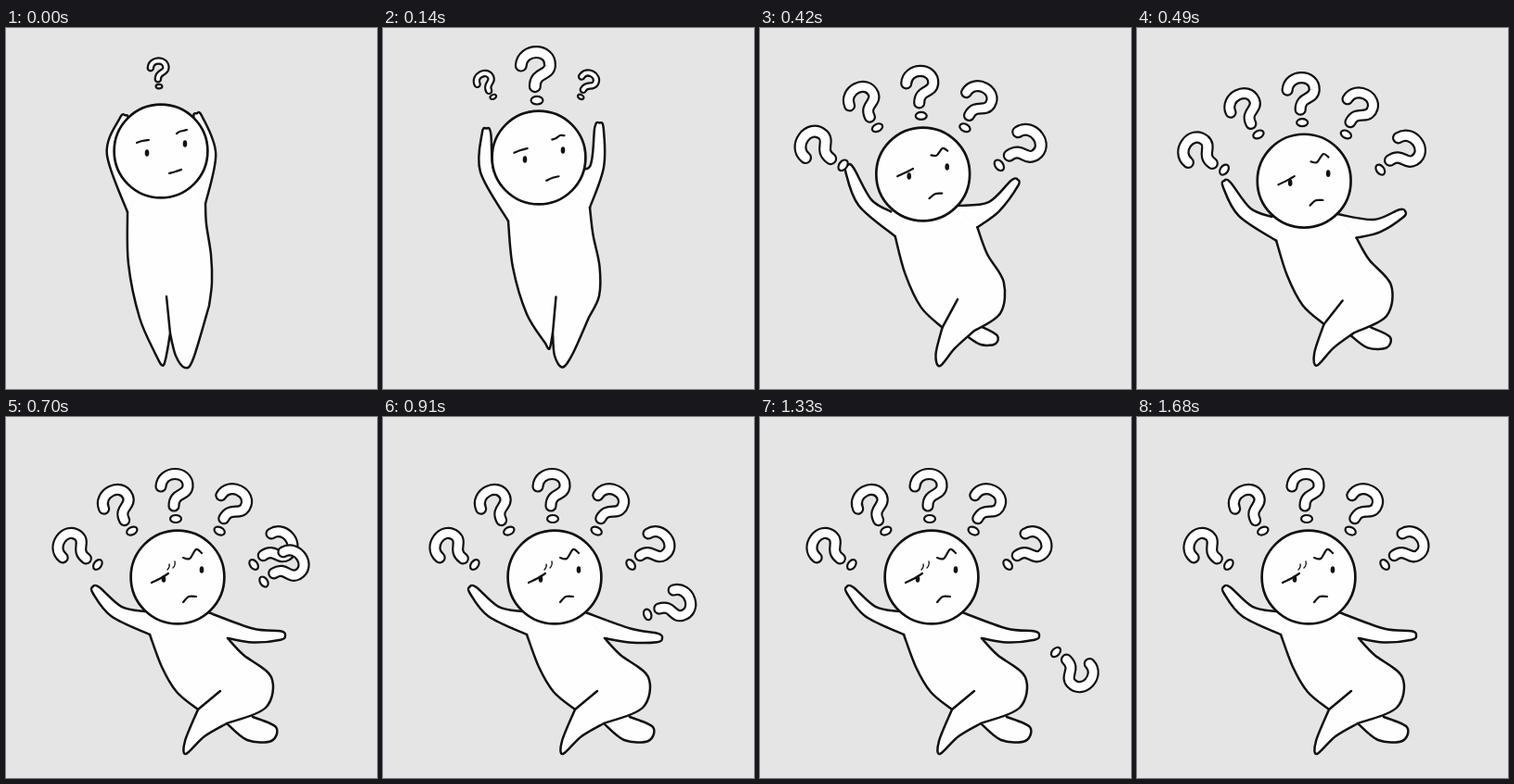
Write an HTML page with a canvas that moves like this. It is 400 px wide and 390 px high and loops after 1.75 s.

```html
<!DOCTYPE html>
<html lang="en">
<head>
<meta charset="utf-8">
<title>Confused</title>
<style>
html, body { margin: 0; width: 100%; height: 100%; overflow: hidden; background: #e5e5e5; }
canvas { display: block; }
</style>
</head>
<body>
<canvas id="stage" width="400" height="390"></canvas>
<script>
const ctx = document.getElementById('stage').getContext('2d');
const STEP = 70, STEPS = 25, SETTLED = 8;
const PAPER = '#e5e5e5', WHITE = '#fefefe', INK = '#111';

const points = text => text.split(' ').map(p => p.split(',').map(Number));
const parse = parts => Object.fromEntries(Object.entries(parts).map(([k, v]) => [k, points(v)]));
const mix = (a, b, t) => a + (b - a) * t;
const mixPoints = (a, b, t) => a.map((p, i) => p.map((v, j) => mix(v, b[i][j], t)));
const mixParts = (a, b, t) =>
  Object.fromEntries(Object.keys(a).map(k => [k, mixPoints(a[k], b[k], t)]));

// Arms list neck, elbow, palm; the body runs from armpit to armpit
const [hiding, reaching, leaning] = [{
  head: '167,133',
  armL: '145,120 116,138 127,99',
  armR: '190,120 219,138 207,97',
  side: '131,199 132,255 144,313 161,352',
  rear: '161,352 170,364 177,330',
  leg: '177,330 183,354 193,367 202,357 219,300',
  hip: '219,300 222,275 221,245 216,212 215,190',
  fold: '173,290 177,330',
  foot: '196,330 196,330 196,330 196,330 196,330'
}, {
  head: '169,147',
  armL: '135,190 109,173 96,128',
  armR: '212,178 242,162 259,118',
  side: '139,218 148,262 166,305 189,329',
  rear: '189,329 189,329 189,329',
  leg: '189,329 187,354 194,366 207,347 225,325',
  hip: '225,325 244,304 246,270 237,235 231,198',
  fold: '200,291 189,329',
  foot: '212,334 222,337 230,335 230,330 220,322'
}, {
  head: '185,173',
  armL: '150,210 119,210 97,187',
  armR: '218,211 266,236 296,236',
  side: '155,235 168,270 184,297 207,316',
  rear: '207,316 207,316 207,316',
  leg: '207,316 193,350 194,364 214,345 238,331',
  hip: '238,331 280,314 286,281 256,257 239,239',
  fold: '231,296 207,316',
  foot: '238,331 260,349 286,350 291,335 266,324'
}].map(parse);

// Relative to the centre of the head
const calm = parse({
  browL: '-26,-9 -20,-11 -13,-12',
  browR: '17,-19 20,-21 24,-22 28,-23',
  mouth: '9,24 16,22 22,20'
});
const worried = parse({
  browL: '-28,6 -18,1 -10,-4',
  browR: '6,-21 13,-20 20,-30 26,-26',
  mouth: '6,27 12,21 20,21'
});
const eyes = points('-15,2 26,-8');

const hook = new Path2D('M-16-35C-15-53 14-53 13-35C12-24-2-29-2-14');

// Step, x, y of the loose mark's dot
const fall = [[8, 266, 158], [10, 278, 178], [15, 290, 237], [19, 319, 254], [23, 335, 332]];

function fallAt(step) {
  const i = fall.findIndex(key => key[0] >= step);
  const a = fall[i - 1], b = fall[i], t = (step - a[0]) / (b[0] - a[0]);
  return [mix(a[1], b[1], t), mix(a[2], b[2], t)];
}

function poseAt(step) {
  if (step < 4) return mixParts(hiding, reaching, step / 4);
  const p = mixParts(reaching, leaning, Math.min(1, (step - 4) / 4) ** 1.25);
  p.armR[2][1] += 7 * Math.exp(-(((step - 15) / 2) ** 2)); // the loose mark lands on the hand
  return p;
}

// Smooth curves through each run of points, joined with corners
function curve(...runs) {
  const path = new Path2D();
  path.moveTo(...runs[0][0]);
  for (const run of runs) {
    for (let i = 0; i < run.length - 1; i++) {
      const p = run[i], q = run[i + 1], before = run[i - 1] || p, after = run[i + 2] || q;
      path.bezierCurveTo(
        p[0] + (q[0] - before[0]) / 6, p[1] + (q[1] - before[1]) / 6,
        q[0] - (after[0] - p[0]) / 6, q[1] - (after[1] - p[1]) / 6, ...q);
    }
  }
  return path;
}

// Tapered outline from the armpit round the hand to the neck
function armOutline(armpit, [neck, elbow, palm], side) {
  const dx = palm[0] - elbow[0], dy = palm[1] - elbow[1], length = Math.hypot(dx, dy);
  const ux = dx / length, uy = dy / length;
  const offset = ([x, y], along, out) =>
    [x + ux * along + uy * out * side, y + uy * along - ux * out * side];
  return [armpit, offset(elbow, 0, 7.5), offset(palm, 0, 4.7), offset(palm, 5, 0),
    offset(palm, 0, -4.7), offset(elbow, 0, -7.5), neck];
}

function ink(path, width = 2.5, color = INK) {
  ctx.strokeStyle = color;
  ctx.lineWidth = width;
  ctx.stroke(path);
}

function oval(x, y, rx, ry) {
  const path = new Path2D();
  path.ellipse(x, y, rx, ry, 0, 0, Math.PI * 2);
  return path;
}

function drawMark(x, y, degrees, scale) {
  ctx.save();
  ctx.translate(x, y);
  ctx.rotate(degrees * Math.PI / 180);
  ctx.scale(scale, scale);
  const line = 2.2 / scale;
  ink(hook, 11 + line);
  ink(hook, 11 - line, WHITE);
  const dot = oval(0, 0, 6, 4);
  ctx.fillStyle = WHITE;
  ctx.fill(dot);
  ink(dot, line);
  ctx.restore();
}

// Marks fan out above the head, each popping up with a damped overshoot
function drawFan([cx, cy], step) {
  for (let i = -2; i <= 2; i++) {
    const age = step - 2 * Math.abs(i);
    if (age < 0) continue;
    const degrees = 27 * i, angle = degrees * Math.PI / 180;
    const scale = 1 - 0.43 * Math.exp(-0.8 * age) * Math.cos(1.3 * age);
    const rise = (1 - scale) * (16 + 45 * Math.abs(Math.sin(angle)));
    drawMark(cx - 2 + 104 * Math.sin(angle), cy + 57 - 120 * Math.cos(angle) - rise, degrees, scale);
  }
}

function drawFace(step) {
  const face = mixParts(calm, worried, Math.min(1, step / SETTLED));
  for (const line of Object.values(face)) ink(curve(line), 2.2);
  ctx.fillStyle = INK;
  for (const [x, y] of eyes) ctx.fill(oval(x, y, 2.3, 3.8));
  if (step >= SETTLED) ink(new Path2D('M-3-17Q-2-13-5-10M-9-14Q-8-11-11-8'), 1.3);
}

function drawFigure(p, step) {
  const center = p.head[0];
  const foot = curve(p.foot);
  ctx.fillStyle = WHITE;
  ctx.fill(foot);
  ink(foot);

  const limbs = [
    [p.side, p.rear, p.leg, p.hip],
    [armOutline(p.side[0], p.armL, 1)],
    [armOutline(p.hip[4], p.armR, -1)]
  ];
  for (const runs of limbs) {
    const shape = curve(...runs);
    shape.lineTo(...center);
    ctx.fill(shape);
  }
  for (const runs of limbs) ink(curve(...runs));
  ink(curve(p.fold));

  const head = oval(...center, 50.4, 50.4);
  ctx.fill(head);
  ink(head, 2.7);
  ctx.save();
  ctx.translate(...center);
  drawFace(step);
  ctx.restore();
}

function draw(step) {
  ctx.fillStyle = PAPER;
  ctx.fillRect(0, 0, 400, 390);
  const p = poseAt(step);
  drawFigure(p, step);
  drawFan(p.head[0], step);
  if (step > SETTLED && step < STEPS - 1) {
    drawMark(...fallAt(step), 55 + 0.65 * (step - SETTLED) ** 2, 1);
  }
}

ctx.lineCap = ctx.lineJoin = 'round';
function tick() {
  draw(Math.floor(performance.now() / STEP) % STEPS);
  requestAnimationFrame(tick);
}
tick();
</script>
</body>
</html>
```
